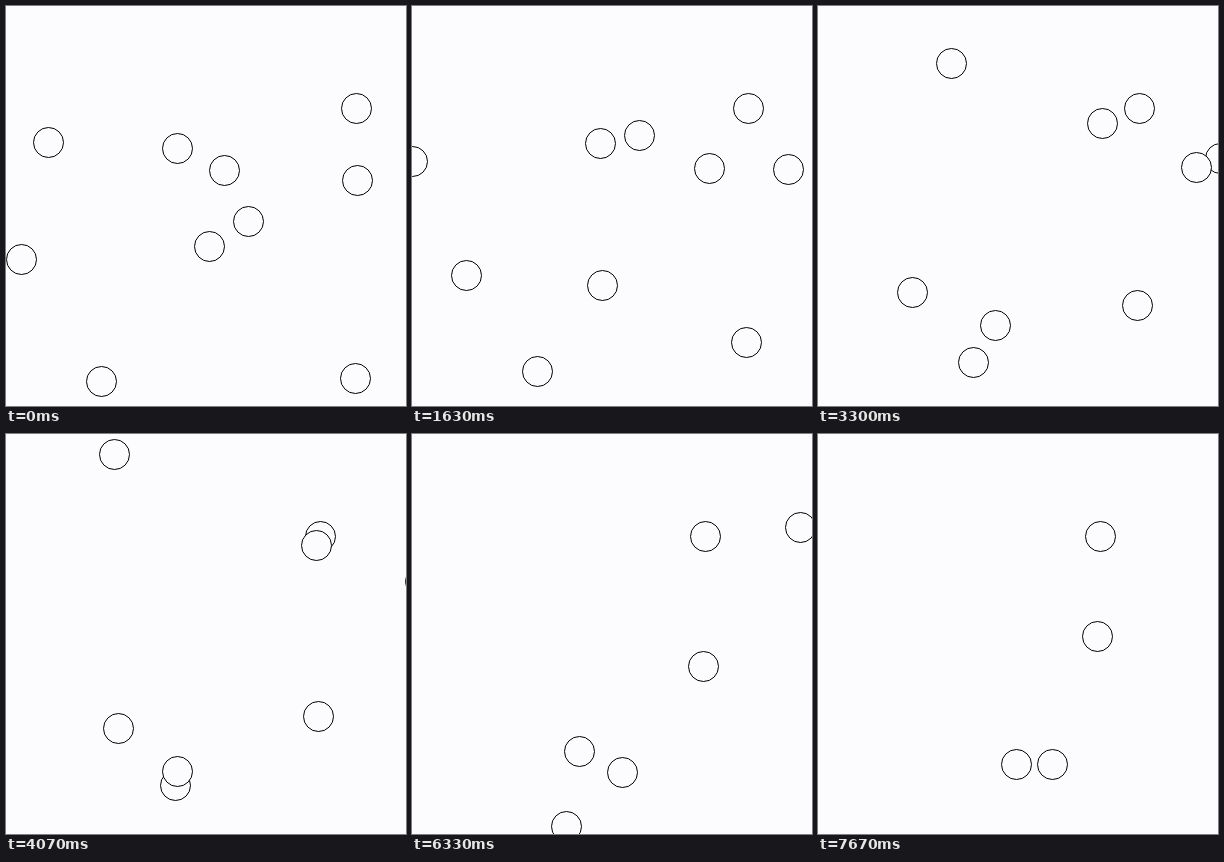
Animation of 400x400 px, one loop 7.71 s. Source, as an HTML page with a canvas:

```html
<!DOCTYPE html>
<html lang="en">
<head>
<meta charset="utf-8">
<title>Drifting circles</title>
<style>
  html, body { margin: 0; width: 100%; height: 100%; overflow: hidden; background: #fcfcfe; }
  canvas { display: block; }
</style>
</head>
<body>
<canvas id="stage" width="400" height="400"></canvas>
<script>
const ctx = document.getElementById('stage').getContext('2d');
const SIZE = 400, LOOP = 7710, LAST_STEP = 230, STEPS_PER_MS = 0.03, RADIUS = 15;

const pt = (x, y) => ({ x, y });

// Each circle drifts in a straight line between two points; listed back to front.
const paths = [
  [pt(350.75, 102), pt(282, 102)],
  [pt(95.6, 375.4), pt(234.5, 330.9)],
  [pt(42.5, 136.5), pt(-155, 225.7)],
  [pt(351.5, 174.5), pt(470.2, 123.7)],
  [pt(218.5, 164.2), pt(591, 158)],
  [pt(15.7, 253.5), pt(198.9, 330.5)],
  [pt(349.1, 372.5), pt(279.4, 202.5)],
  [pt(171.5, 142.6), pt(434.4, 83.3)],
  [pt(242.3, 215.5), pt(-10, -151.8)],
  [pt(203.1, 240.6), pt(144, 424.1)],
];

// Centres snap to the middle of a whole pixel, which keeps the outlines crisp.
const glide = (a, b, k) => Math.floor(a + (b - a) * k) + 0.5;

function draw(time) {
  const step = Math.min(LAST_STEP, Math.floor((time % LOOP + 4) * STEPS_PER_MS));
  const k = step / LAST_STEP;
  ctx.fillStyle = '#fcfcfe';
  ctx.strokeStyle = '#000';
  ctx.fillRect(0, 0, SIZE, SIZE);
  for (const [from, to] of paths) {
    ctx.beginPath();
    ctx.arc(glide(from.x, to.x, k), glide(from.y, to.y, k), RADIUS, 0, 2 * Math.PI);
    ctx.fill();
    ctx.stroke();
  }
}

const start = performance.now();
function tick() {
  draw(performance.now() - start);
  requestAnimationFrame(tick);
}
tick();
</script>
</body>
</html>
```
